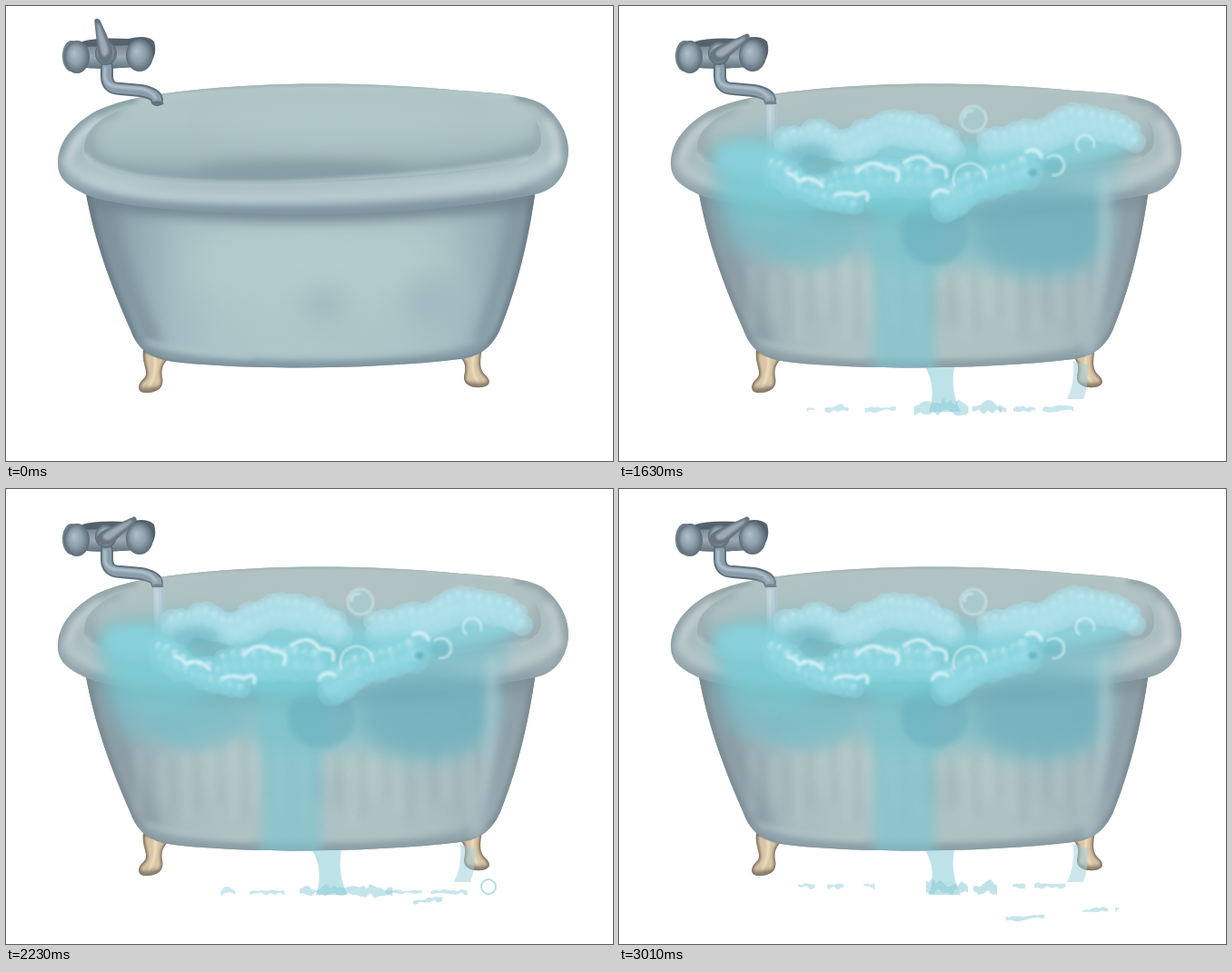
Recreate the animation shown at these times as an HTML page with a canvas. Size 668x500 px, loop 3070 ms.

```html
<!DOCTYPE html>
<html lang="en">
<head>
<meta charset="utf-8">
<title>Bathtub</title>
<style>
html, body { margin: 0; width: 100%; height: 100%; overflow: hidden; background: #fff; }
canvas { display: block; width: 668px; height: 500px; }
</style>
</head>
<body>
<canvas id="stage" width="668" height="500"></canvas>
<script>
const W = 668, H = 500, LOOP = 3070;
const stage = document.getElementById('stage').getContext('2d');

// Rim and body run the same way round, so their union has no hole
const RIM = new Path2D('M57 172C58 148 74 130 100 115C130 101 165 97 200 93C290 83 400 83 500 93C545 96 575 98 592 109C606 120 619 138 619 160C618 185 604 203 582 207C500 222 420 229 320 229C220 228 130 222 90 208C68 198 57 190 57 172Z');
const BODY = new Path2D('M583 200C575 260 562 310 544 355C536 373 523 385 500 388C400 400 260 400 185 391C160 388 145 378 137 356C117 310 97 260 87 200Z');
const BASIN = new Path2D('M86 158C85 133 112 116 150 106C200 94 270 90 340 90C430 90 505 93 545 102C578 110 590 130 589 148C588 162 572 171 540 177C470 188 400 191 345 194C270 197 200 196 155 190C115 184 88 174 86 158Z');
const TUB = new Path2D();
TUB.addPath(RIM);
TUB.addPath(BODY);

const clamp = v => Math.max(0, Math.min(1, v));

function hash(n) {
  const s = Math.sin(n * 127.1) * 43758.5453;
  return s - Math.floor(s);
}

function noise(x) {
  const i = Math.floor(x), k = x - i;
  return hash(i) + (hash(i + 1) - hash(i)) * k * k * (3 - 2 * k);
}

function layer(draw) {
  const c = document.createElement('canvas');
  c.width = W;
  c.height = H;
  draw(c.getContext('2d'));
  return c;
}

const toPath = p => typeof p === 'string' ? new Path2D(p) : p;

function fill(g, p, style, blur = 0) {
  g.filter = blur ? `blur(${blur}px)` : 'none';
  g.fillStyle = style;
  g.fill(toPath(p));
  g.filter = 'none';
}

function line(g, p, style, width, blur = 0) {
  g.filter = blur ? `blur(${blur}px)` : 'none';
  g.strokeStyle = style;
  g.lineWidth = width;
  g.lineCap = g.lineJoin = 'round';
  g.stroke(toPath(p));
  g.filter = 'none';
}

function oval(g, x, y, rx, ry, style, blur = 0) {
  const p = new Path2D();
  p.ellipse(x, y, rx, ry, 0, 0, 7);
  fill(g, p, style, blur);
}

function ramp(g, box, stops) {
  const r = g.createLinearGradient(...box);
  stops.forEach((c, i) => r.addColorStop(i / (stops.length - 1), c));
  return r;
}

function within(g, p, draw) {
  g.save();
  g.clip(p);
  draw();
  g.restore();
}

function ball(g, x, y, rx, ry) {
  g.save();
  g.translate(x, y);
  g.scale(rx, ry);
  const r = g.createRadialGradient(-.25, -.25, 0, 0, 0, 1);
  r.addColorStop(0, '#b1c0ca');
  r.addColorStop(.55, '#8d9fab');
  r.addColorStop(1, '#5b6a75');
  oval(g, 0, 0, 1, 1, r);
  g.restore();
}

function drawFoot(g, shape, shine, sole) {
  const p = new Path2D(shape);
  fill(g, p, '#dac6a5');
  within(g, p, () => {
    line(g, p, '#776c60', 4, 1.4);
    line(g, shine, '#eddfc0', 3, 1);
    line(g, sole, '#85786a', 5, 2);
  });
}

function drawTub(g) {
  drawFoot(g, 'M151 378C149 395 159 403 151 410C143 417 145 426 156 425C169 424 174 418 172 408C170 398 174 392 179 387Z',
    'M164 384Q167 402 157 420', 'M147 423L168 421');
  drawFoot(g, 'M496 384C507 390 506 398 504 407C503 416 512 420 524 419C534 417 534 411 527 405C520 398 522 388 524 376Z',
    'M514 386Q511 402 520 414', 'M507 417L532 417');

  fill(g, BODY, ramp(g, [88, 0, 582, 0],
    ['#7b8d98', '#91a8b1', '#a5bdc2', '#acc5c8', '#aec7c9', '#aec7c9', '#adc6c8', '#adc5c8', '#a8c0c4', '#99b0b8', '#7f949e']));
  within(g, BODY, () => {
    oval(g, 345, 285, 150, 45, '#b2cccc', 22);
    oval(g, 350, 328, 24, 17, '#a1bbc0', 11);
    oval(g, 475, 325, 38, 30, '#a3bcc1', 12);
    line(g, 'M107 215Q122 290 162 368', '#7a8e99', 14, 8);
    line(g, 'M563 215Q553 290 522 365', '#8197a2', 12, 6);
    line(g, 'M92 212Q320 244 578 211', '#71858f', 18, 7);
    line(g, BODY, '#61737e', 7, 3.5);
    line(g, 'M145 371C180 391 270 393 330 394C410 395 480 390 528 373', '#8299a4', 8, 4);
    line(g, 'M155 369Q190 381 270 385', '#b8cdd1', 3, 3);
  });

  fill(g, RIM, ramp(g, [0, 86, 0, 229], ['#b7caca', '#adc3c6', '#a9c0c5', '#b1c7cc', '#8ba1ab']));
  within(g, RIM, () => {
    line(g, RIM, '#74888f', 7, 4);
    line(g, 'M90 119Q65 145 65 172Q76 196 112 211', '#899ca7', 13, 7);
    line(g, 'M598 119Q617 142 610 173Q600 195 570 202', '#899ca6', 10, 6);
    line(g, 'M68 172C84 194 130 206 190 209C290 213 400 209 480 201C550 193 590 185 606 168', '#bacdd1', 13, 5);
    line(g, 'M70 166Q75 143 101 127', '#d1dee1', 8, 4);
    line(g, 'M596 127Q609 144 604 169', '#ced9dc', 8, 4);
    line(g, 'M150 104Q330 83 555 100', '#b8caca', 12, 3);
    line(g, 'M95 209C180 228 390 237 578 207', '#839aa5', 7, 4);
  });

  fill(g, BASIN, ramp(g, [0, 88, 0, 196], ['#b0c6c6', '#afc5c7', '#a7bec1', '#91a8ad']), 2);
  within(g, BASIN, () => {
    line(g, 'M88 140Q82 168 120 181Q180 195 345 193Q500 187 585 155', '#869ea5', 12, 8);
    oval(g, 325, 181, 120, 10, '#849ba1', 8);
    line(g, 'M91 140Q94 124 125 116', '#8fa6ad', 7, 5);
    line(g, 'M586 130Q592 150 580 162', '#93a8ae', 8, 5);
    oval(g, 365, 126, 140, 18, '#b0c7c8', 13);
  });
  line(g, 'M88 163Q95 178 150 188C220 197 300 196 380 190Q520 181 574 167', '#c0d3d6', 3, 2);
}

function drawTap(g) {
  fill(g, 'M84 39Q98 34 135 36Q155 31 163 39Q166 49 162 58L145 67Q110 70 84 65Z', '#55616b', .5);
  fill(g, 'M80 45L145 43L147 65Q110 72 80 67Z', ramp(g, [0, 42, 0, 70], ['#74838f', '#9cabb5', '#5c6c78']), .5);
  oval(g, 72, 55, 10, 17, '#71818c');
  ball(g, 78, 56, 14, 18);
  ball(g, 147, 54, 15, 18);
  const spout = 'M111 67L111 77Q111 91 126 91L148 93Q165 96 166 103';
  line(g, spout, '#5f707b', 14);
  line(g, spout, '#899daa', 10, .7);
  line(g, 'M109 68L109 79Q111 89 127 89L149 91Q160 93 165 101', '#b4c6d0', 3, 1);
  oval(g, 167, 107, 6.5, 2.5, '#60737f');
}

function drawHandle(g, angle) {
  ball(g, 110, 52, 12, 13);
  g.save();
  g.translate(109, 53);
  g.rotate(angle);
  fill(g, 'M-3 -39Q0 -42 3 -38Q7 -20 9 -5Q8 8 0 10Q-9 8 -7 -6Z', '#66757f');
  fill(g, 'M-1 -36Q2 -35 3 -22L5 -4Q2 5 -3 1Q-5 -12 -1 -36Z', '#9cabb5', .8);
  g.restore();
}

// Teal water spilling over the front of the tub
function drawSpill(g) {
  within(g, TUB, () => {
    g.fillStyle = 'rgba(178,184,182,.24)';
    g.fillRect(60, 86, 560, 315);
    for (let x = 145; x < 525; x += 13) {
      const top = 285 + 12 * Math.sin(x);
      line(g, `M${x} ${top}L${x + 2} ${350 + 15 * Math.cos(x * 3)}`, x % 2 ? 'rgba(200,214,214,.25)' : 'rgba(135,162,168,.18)', 7, 4);
    }
    fill(g, 'M104 152Q180 128 260 140Q350 130 400 148Q470 125 540 145Q575 155 545 188L535 275Q470 315 395 284Q300 300 255 268Q190 297 122 265Q102 210 104 152Z', 'rgba(122,192,202,.68)', 11);
    fill(g, 'M280 210L350 210L348 405L280 405Z', 'rgba(124,198,207,.62)', 6);
    oval(g, 347, 250, 37, 35, 'rgba(101,172,186,.5)', 3);
    oval(g, 212, 255, 48, 33, 'rgba(119,187,197,.35)', 4);
    oval(g, 463, 247, 73, 48, 'rgba(111,171,186,.6)', 10);
    oval(g, 170, 208, 60, 30, 'rgba(120,207,212,.6)', 12);
    oval(g, 310, 205, 65, 22, 'rgba(116,203,210,.65)', 9);
    line(g, 'M534 190Q538 280 517 380', 'rgba(190,214,217,.4)', 13, 5);
  });
}

function bubble(g, x, y, r, rgb) {
  const s = g.createRadialGradient(x - r * .15, y - r * .35, 0, x, y, r);
  s.addColorStop(0, 'rgba(196,233,242,.75)');
  s.addColorStop(.5, `rgba(${rgb},.6)`);
  s.addColorStop(.85, `rgba(${rgb},.42)`);
  s.addColorStop(1, `rgba(${rgb},0)`);
  oval(g, x, y, r, r, s);
}

// Bubbles of seeded size strung along a chain of points
function heap(g, points, size, rgb) {
  for (let i = 1; i < points.length; i++) {
    const [x0, y0] = points[i - 1], [x1, y1] = points[i];
    const n = Math.ceil(Math.hypot(x1 - x0, y1 - y0) / (size * .9));
    for (let k = 0; k < n; k++) {
      const seed = x0 + k * 7, f = k / n;
      const r = size * (.8 + .45 * hash(seed));
      const x = x0 + (x1 - x0) * f, y = y0 + (y1 - y0) * f;
      bubble(g, x + 4, y + 13, r * 1.2, rgb);
      bubble(g, x, y + 5 * hash(seed + 3) - 2, r, rgb);
    }
  }
}

function ring(g, x, y, r, from = 0, to = 7, alpha = .7) {
  const p = new Path2D();
  p.arc(x, y, r, from, to);
  line(g, p, `rgba(218,244,248,${alpha})`, 2.5, .9);
}

function drawFoam(g) {
  fill(g, 'M178 150Q210 128 245 145Q310 128 370 145L400 153Q460 128 500 120Q550 118 572 145Q550 166 470 176L385 180L250 168Z', 'rgba(143,212,222,.8)', 6);
  const pale = '172,223,233', teal = '140,213,223';
  heap(g, [[184, 144], [212, 134], [250, 145], [293, 124], [340, 130], [372, 150]], 13, pale);
  heap(g, [[405, 145], [460, 135], [500, 116], [545, 124], [574, 140]], 13, pale);
  oval(g, 390, 122, 14, 14, 'rgba(164,208,212,.55)');
  ring(g, 390, 122, 14, 0, 7, .55);
  ring(g, 387, 120, 7, 3, 5);
  ring(g, 513, 150, 10, 2.3, 6.6);

  oval(g, 208, 160, 28, 12, 'rgba(104,179,190,.6)', 6);
  fill(g, 'M106 160Q130 143 170 158L220 185Q290 160 350 168L445 155L500 176Q420 195 380 212L345 222L250 220L150 212Q105 195 106 160Z', 'rgba(124,205,214,.6)', 8);
  oval(g, 144, 166, 38, 19, 'rgba(140,212,222,.7)', 6);
  heap(g, [[170, 172], [205, 190], [265, 207]], 12, teal);
  heap(g, [[240, 182], [300, 180], [352, 182]], 14, teal);
  heap(g, [[355, 208], [386, 188], [455, 168]], 13, teal);
  line(g, 'M186 182Q195 184 198 191Q210 182 224 196M238 206Q250 201 262 206Q276 198 273 211M262 180Q277 164 294 176Q312 176 306 190M314 170Q334 156 345 174Q363 172 360 186M345 207Q350 196 362 203M448 158Q460 152 465 164',
    'rgba(222,245,249,.85)', 4, 1.6);
  ring(g, 386, 189, 18, 2.8, 6.2);
  oval(g, 478, 174, 10, 9, 'rgba(100,172,182,.3)', 2);
  ring(g, 479, 173, 11, 4, 8);
  oval(g, 455, 181, 5, 4, 'rgba(82,160,172,.55)', 1.5);
}

const base = layer(g => { drawTub(g); drawTap(g); });
const spill = layer(drawSpill);
const foam = layer(drawFoam);

// Ragged strip of water on the floor; gap sets how broken it is
function puddle(g, x0, x1, y, h, gap, seed, slope = 0) {
  for (let x = x0; x < x1; x += 2) {
    const body = noise(x / 11 + seed) - gap;
    if (body < 0) continue;
    const up = h * (.25 + body) * (.5 + noise(x / 4 + seed));
    const down = h * .9 * noise(x / 5 + seed + 9);
    g.fillRect(x, y + slope * (x - x0) - up, 2, up + down);
  }
}

function drawFloor(g, t) {
  const fall = clamp((t - 1430) / 120);
  if (!fall) return;
  g.save();
  g.beginPath();
  g.rect(0, 380, W, 67 * fall);
  g.clip();
  fill(g, 'M337 397C346 412 347 430 341 446L376 446C368 430 366 414 369 397Z', 'rgba(145,209,219,.6)');
  fill(g, 'M500 390Q502 415 493 432L511 432Q517 418 516 395Z', 'rgba(155,206,217,.5)');
  g.restore();

  // Each pass spreads the water out and draws it back in
  const pass = (t - 1450) / 570;
  const spread = Math.sin(Math.PI * clamp(pass % 1));
  const late = clamp((t - 2300) / 300);
  const y = 443 - 7 * late;
  const seed = Math.floor(t / 180) * 31;
  g.fillStyle = 'rgba(158,212,223,.6)';
  puddle(g, 218 - 28 * spread, 288 + 18 * spread * (1 - late), y, 5, .36, seed);
  puddle(g, 425 - 8 * spread, 428 + 85 * spread, y, 4, .3, seed + 50);
  if (pass > .9) puddle(g, 426, 480 + 70 * late, 456 + 17 * late, 4, .34, seed + 90, -.1);
  g.fillStyle = 'rgba(140,204,216,.55)';
  puddle(g, 338 - 16 * spread * (1 - late), 378 + 50 * spread, y + 3 * late, 8, .06, seed + 70);
  if (pass > 1.26 && pass < 1.58) {
    const p = new Path2D();
    p.arc(531, 437, 8, 0, 7);
    line(g, p, 'rgba(160,213,223,.8)', 2);
  }
}

function drawStream(g, t) {
  const k = clamp((t - 210) / 210);
  if (!k) return;
  g.save();
  g.beginPath();
  g.rect(150, 108, 40, 82 * k);
  g.clip();
  fill(g, 'M162 108L173 108L177 190L163 190Z', 'rgba(192,216,228,.85)');
  line(g, 'M166 110L167 190', 'rgba(218,234,241,.7)', 3, 1);
  line(g, 'M172 110L175 190', 'rgba(150,185,202,.55)', 1.5, .5);
  g.restore();
}

// Foam rests low and swells once every 690 ms
function swell(t) {
  return 2 - 9 * Math.max(0, Math.cos((t - 1290) / 690 * 2 * Math.PI)) ** 2;
}

function render(t) {
  const g = stage;
  g.fillStyle = '#fff';
  g.fillRect(0, 0, W, H);
  g.drawImage(base, 0, 0);
  drawStream(g, t);
  drawHandle(g, -.23 + 1.26 * clamp((t - 10) / 420));
  if (t < 880) return;
  g.globalAlpha = clamp((t - 820) / 600);
  g.drawImage(spill, 0, 0);
  g.drawImage(foam, 0, swell(t));
  g.globalAlpha = 1;
  drawFloor(g, t);
}

const start = performance.now();
let last = -1;
function tick() {
  const t = (performance.now() - start) % LOOP;
  const step = Math.max(0, Math.floor((t - 10) / 30) * 30 + 10);
  if (step !== last) render(last = step);
  requestAnimationFrame(tick);
}
tick();
</script>
</body>
</html>
```
